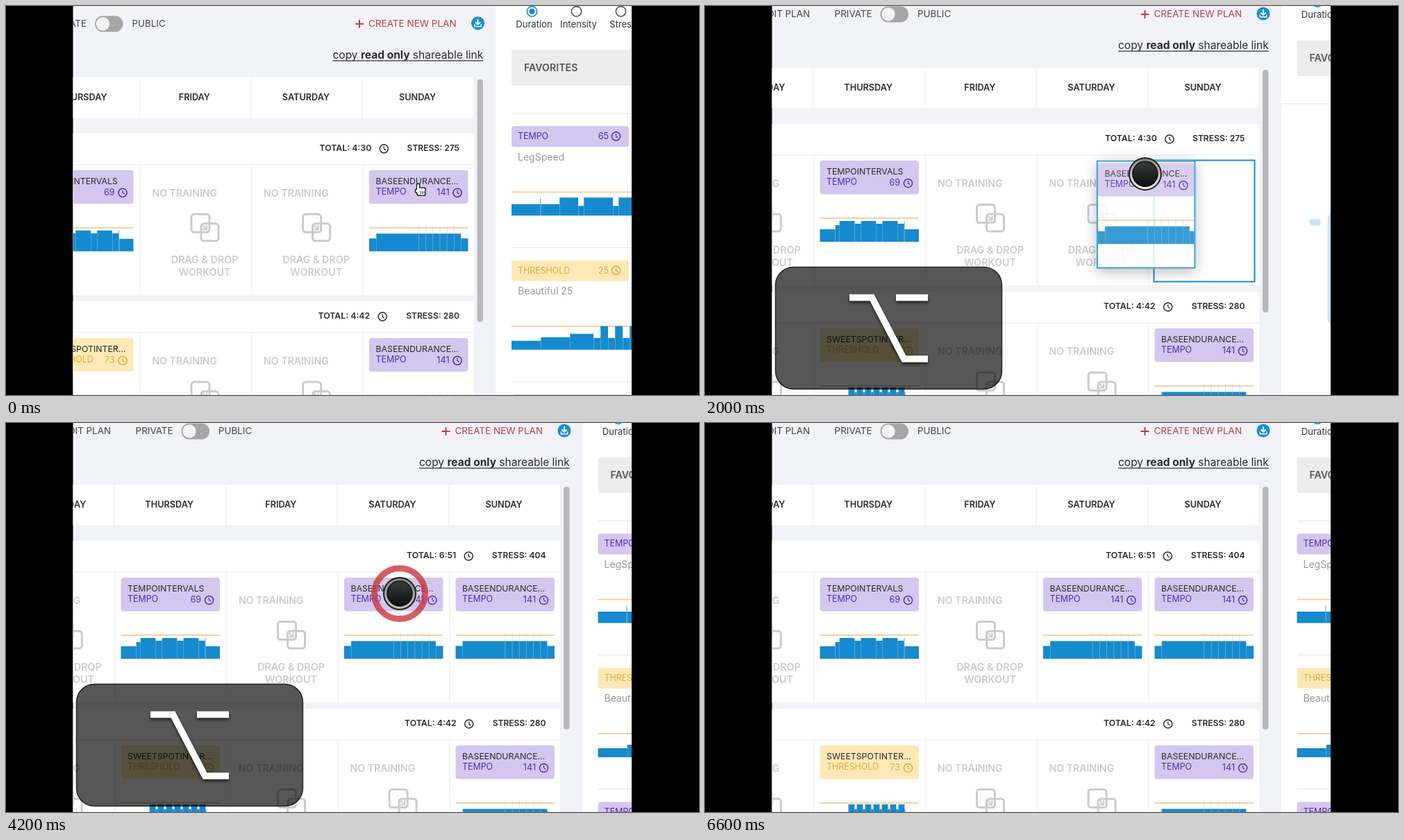
An HTML page with a canvas for the animation above (8000 ms loop, 998 px wide and 561 px high).

```html
<!DOCTYPE html>
<html lang="en">
<head>
<meta charset="utf-8">
<title>Training plan: copy a workout by dragging</title>
<style>
html, body { margin: 0; width: 100%; height: 100%; overflow: hidden; background: #000; }
canvas { display: block; }
</style>
</head>
<body>
<canvas id="stage" width="998" height="561"></canvas>
<script>
const ctx = document.getElementById('stage').getContext('2d');
const COLUMN = 160.6, WEEK = 242;
const INK = '#2b2b2e', BLUE = '#168ace', PALE = '#cbcbcd', RED = '#bf3f4c', RULE = '#ececef';
const ZONES = {
  TEMPO: { fill: '#d4c6ee', ink: '#4a2cbd' },
  THRESHOLD: { fill: '#fde9b7', ink: '#e5aa32' }
};

// Moments are counted in ticks, 15 per second.
const TICKS = 120, PANNED = 8, GRAB = 13, LIFT = 20, NEXT_DAY = 32, DROP = 58, RING_END = 68, FADE = 95;

// Pointer: start, then moves as [from tick, to tick, dx, dy].
const START = [721.5, 251];
const MOVES = [[0, PANNED, -3, -8], [19, NEXT_DAY, -100, -1], [NEXT_DAY, 47, -51.5, 4], [79, 80, 1, 1], [82, 90, 133, 2]];

// Height of each workout's power profile at x.
const endurance = x => x < 10 || x >= 132 ? 18.5 : 25.5;
const intervals = x => x < 22 || x >= 122 ? 18 : x < 28 ? 24 : (x - 28) % 31 < 22 ? 30 : 26;
const sweetspot = x => x < 22 ? 14 : x < 41 || x >= 123 ? 0 : (x - 41) % 12 < 9 ? 32 : 25;
const legspeed = x => x === 41 ? 25 : x < 69 ? 16.5 : (x - 46) % 50 < 8 ? 14 : 26;
const ramp = x => x < 118 ? 13 + 5 * Math.floor(x / 42) : (x - 118) % 21 < 10 ? 17 : 34;

const clamp = v => Math.max(0, Math.min(1, v));
const progress = (k, from, to) => clamp((k - from) / (to - from));
const smooth = v => v * v * (3 - 2 * v);

function text(str, x, y, size, color, weight = 400, align = 'left') {
  ctx.font = `${weight} ${size}px Inter, "Open Sans", sans-serif`;
  ctx.textAlign = align;
  ctx.textBaseline = 'middle';
  ctx.fillStyle = color;
  ctx.fillText(str, x, y);
  return ctx.measureText(str).width;
}

function rect(x, y, w, h, color) {
  ctx.fillStyle = color;
  ctx.fillRect(x, y, w, h);
}

function paint(fill, stroke, width) {
  if (fill) { ctx.fillStyle = fill; ctx.fill(); }
  if (stroke) { ctx.strokeStyle = stroke; ctx.lineWidth = width; ctx.stroke(); }
}

function round(x, y, w, h, r, fill, stroke, width = 1) {
  ctx.beginPath();
  ctx.roundRect(x, y, w, h, r);
  paint(fill, stroke, width);
}

function circle(x, y, r, fill, stroke, width = 1) {
  ctx.beginPath();
  ctx.arc(x, y, r, 0, 2 * Math.PI);
  paint(fill, stroke, width);
}

function line(points, color, width) {
  ctx.beginPath();
  points.forEach(p => ctx.lineTo(...p));
  paint(null, color, width);
}

function clock(x, y, color) {
  circle(x, y, 6.1, null, color, 1.5);
  line([[x, y - 3.5], [x, y], [x + 2.5, y + 1.8]], color, 1.3);
}

function chart(height, x, base, w) {
  rect(x, base - 35, w, 2, '#f2d2a0');
  ctx.beginPath();
  ctx.moveTo(x, base);
  for (let i = 0; i < w; i++) {
    ctx.lineTo(x + i, base - height(i));
    ctx.lineTo(x + Math.min(i + 1, w), base - height(i));
  }
  ctx.lineTo(x + w, base);
  paint(BLUE);
  for (let i = 1; i < w; i++) {
    if (height(i) !== height(i - 1)) rect(x + i, base - 30, .6, 30, 'rgba(255,255,255,.4)');
  }
  if (height === endurance) {
    for (let i = 71; i < 132; i += 10.2) {
      rect(x + i, base - 25.5, .7, 25.5, 'rgba(255,255,255,.4)');
      if (i < 125) rect(x + i, base - 37, .8, 11.5, 'rgba(80,130,170,.25)');
    }
  }
}

function workout(x, y, title, zone, minutes, profile, w = 142.5) {
  const { fill, ink } = ZONES[zone];
  round(x, y, w, 48.5, 4, fill);
  text(title, x + 9.5, y + 16.5, 12.3, INK);
  text(zone, x + 9.5, y + 31.5, 12.4, ink);
  text(minutes, x + w - 27, y + 32.5, 12.6, ink, 400, 'right');
  clock(x + w - 15.5, y + 32.5, ink);
  chart(profile, x, y + 117, w);
}

const enduranceRide = (x, y, w) => workout(x, y, 'BASEENDURANCE...', 'TEMPO', '141', endurance, w);

function emptyDay(column, y) {
  const x = 318 + column * COLUMN;
  text('NO TRAINING', x + 17, y + 34, 14.1, PALE, 600);
  round(x + 73.5, y + 63.5, 26, 26, 4, null, PALE, 3);
  round(x + 87.5, y + 77, 25, 25, 4, null, PALE, 3);
  line([[x + 88, y + 78], [x + 95, y + 85]], PALE, 2);
  line([[x + 95.5, y + 79.5], [x + 95.5, y + 85.5], [x + 89.5, y + 85.5]], PALE, 2);
  text('DRAG & DROP', x + 92.5, y + 130, 14.3, PALE, 600, 'center');
  text('WORKOUT', x + 92.5, y + 148, 14.3, PALE, 600, 'center');
}

function weekFrame(y, total, totalX, stress) {
  rect(0, y, 798, 233, '#fff');
  rect(0, y + 44.5, 798, 1, RULE);
  for (let i = 0; i < 4; i++) rect(156.5 + i * COLUMN, y + 45, 1, 188, RULE);
  const width = text('TOTAL: ' + total, totalX, y + 21.5, 12.3, INK, 600);
  clock(totalX + width + 18, y + 22, INK);
  text('STRESS: ' + stress, 777.5, y + 21.5, 12.1, INK, 600, 'right');
}

function toolbar() {
  text('EDIT PLAN', 151, 12, 13.4, '#444', 400, 'right');
  text('PRIVATE', 240.5, 12, 13.4, '#444', 400, 'right');
  round(252.5, .5, 40.5, 23, 11.5, '#a6a6a6');
  circle(264, 12, 9.7, '#f3f3f3');
  text('PUBLIC', 306, 12, 13.4, '#444');
  line([[627.5, 12], [639.5, 12]], RED, 2);
  line([[633.5, 6], [633.5, 18]], RED, 2);
  text('CREATE NEW PLAN', 646.5, 12, 13.5, RED);

  circle(804, 11, 9.6, '#168fd5');
  line([[804, 5], [804, 12]], '#fff', 2);
  line([[800.3, 9.5], [804, 13], [807.7, 9.5]], '#fff', 1.8);
  line([[799.3, 12.5], [799.3, 15.8], [808.7, 15.8], [808.7, 12.5]], '#fff', 1.4);

  let x = 595;
  x += text('copy ', x, 57.5, 15.5, INK);
  x += text('read only', x, 57.5, 15.5, INK, 700);
  x += text(' shareable link', x, 57.5, 15.5, INK);
  rect(595, 64.5, x - 595, 1.2, INK);
}

function calendar(copied, slot) {
  rect(0, 89, 798, 58.5, '#fff');
  ['WEDNESDAY', 'THURSDAY', 'FRIDAY', 'SATURDAY', 'SUNDAY'].forEach((day, i) => {
    text(day, 74.6 + i * COLUMN, 118, 12.7, INK, 600, 'center');
    rect(155.5 + i * COLUMN, 89, 1, 58, RULE);
  });
  if (copied) weekFrame(170, '6:51', 577, '404');
  else weekFrame(170, '4:30', 576, '275');
  weekFrame(170 + WEEK, '4:42', 574, '280');
  round(803, 92, 8.5, 350, 4, '#b9b9bb');

  for (const y of [223, 223 + WEEK]) {
    emptyDay(-2, y);
    emptyDay(0, y);
  }
  workout(165.5, 223, 'TEMPOINTERVALS', 'TEMPO', '69', intervals);
  workout(165.5, 223 + WEEK, 'SWEETSPOTINTER...', 'THRESHOLD', '73', sweetspot);
  emptyDay(1, 223 + WEEK);
  enduranceRide(647.5, 223 + WEEK);
  if (copied) enduranceRide(647.5 - COLUMN, 223);
  else emptyDay(1, 223);
  if (slot !== 'sunday') enduranceRide(647.5, 223);
}

function favorite(y, zone, minutes, name, profile) {
  const { fill, ink } = ZONES[zone];
  rect(853, y - 19, 180, 1, '#e3e3e5');
  round(852.5, y, 169, 30, 4, fill);
  text(zone, 861.5, y + 15, 12.4, ink);
  text(minutes, 992.5, y + 15, 12.6, ink, 400, 'right');
  clock(1003, y + 14.5, ink);
  text(name, 861.5, y + 45, 14, '#999');
  chart(profile, 852.5, y + 129, 174);
}

function sidebar(showTrash) {
  rect(830, -20, 220, 620, '#fff');
  ['Duration', 'Intensity', 'Stress'].forEach((label, i) => {
    const x = 882 + i * 64, color = i ? '#555' : '#1b87e0';
    circle(x, -6, 7.2, '#fff', color, 1.6);
    if (!i) circle(x, -6, 4.2, color);
    text(label, x + 3, 13, 13.1, '#333', 400, 'center');
  });
  round(852.5, 49.5, 200, 51.5, 4, '#ececed');
  text('FAVORITES', 870.5, 75.5, 14.2, '#555', 600);
  if (showTrash) {
    rect(830, 140.5, 200, 1, '#e3e3e5');
    round(870.5, 307, 16, 10, 4, '#c8e6f4');
    round(896.5, 296, 90, 166, 12, '#c8e6f4');
    return;
  }
  favorite(159.5, 'TEMPO', '65', 'LegSpeed', legspeed);
  favorite(353, 'THRESHOLD', '25', 'Beautiful 25', ramp);
  favorite(546.5, 'TEMPO', '60', 'Steady', endurance);
}

// A shadow around the card only, so that it does not darken the translucent inside.
function cardShadow(x, y, w, h) {
  ctx.save();
  ctx.beginPath();
  ctx.rect(0, 0, 998, 561);
  ctx.rect(x, y, w, h);
  ctx.clip('evenodd');
  ctx.shadowColor = 'rgba(0,0,0,.28)';
  ctx.shadowBlur = 18;
  ctx.shadowOffsetY = 4;
  rect(x, y, w, h, '#fff');
  ctx.restore();
}

function outline(x, y, w, h) {
  ctx.strokeStyle = BLUE;
  ctx.lineWidth = 2;
  ctx.strokeRect(x, y, w, h);
}

function draggedCard(x, y, lifted) {
  const left = x - 69, top = y - 18.5;
  ctx.save();
  if (lifted) {
    cardShadow(left - 1, top - 1, 142.5, 156);
    ctx.globalAlpha = .85;
  }
  rect(left - 1, top - 1, 142.5, 156, '#fff');
  enduranceRide(left + 1, top + 2.5, 138.5);
  outline(left, top, 140.5, 154);
  ctx.restore();
}

function optionKey(alpha) {
  ctx.save();
  ctx.globalAlpha = alpha;
  round(101.5, 376.5, 326, 176, 26, 'rgba(0,0,0,.66)', 'rgba(0,0,0,.75)', 1.5);
  ctx.shadowColor = 'rgba(0,0,0,.6)';
  ctx.shadowBlur = 4;
  ctx.shadowOffsetY = 3;
  line([[208, 420.5], [240.5, 420.5], [286.5, 509], [321, 509]], '#fff', 9.5);
  line([[275, 420.5], [321, 420.5]], '#fff', 9.5);
  ctx.restore();
}

function verticalFade(y, r, from, to) {
  const gradient = ctx.createLinearGradient(0, y - r, 0, y + r);
  gradient.addColorStop(0, from);
  gradient.addColorStop(1, to);
  return gradient;
}

function disk(x, y, alpha, pressed) {
  ctx.save();
  ctx.globalAlpha = alpha;
  circle(x, y, 24, '#1d1f1d');
  circle(x, y, 22, verticalFade(y, 22, '#83857c', pressed ? '#f7f7f2' : '#c4c5b4'));
  circle(x, y, 18, verticalFade(y, 18, '#3a3d3d', '#0d0f0f'), '#111', 1.5);
  ctx.restore();
}

function hand(x, y) {
  for (const [grow, color] of [[1.2, '#111'], [0, '#fff']]) {
    const part = (dx, dy, w, h) => round(x + dx - grow, y + dy - grow, w + 2 * grow, h + 2 * grow, 2, color);
    part(-5, -8, 3, 14);
    part(-7, 0, 5, 4);
    part(-4, -2, 10.5, 10);
  }
  for (let i = 0; i < 3; i++) rect(x - .5 + i * 2.5, y + 2, 1, 4.5, '#333');
}

function releaseRing(x, y, p) {
  circle(x, y, 25 + 23 * p, null, `rgba(200,55,60,${.8 * clamp(2 - 2 * p)})`, 9);
}

function pointerAt(k) {
  return MOVES.reduce(([x, y], [from, to, dx, dy]) => {
    const p = progress(k, from, to);
    return [x + dx * p, y + dy * p];
  }, START);
}

function draw(k) {
  const pan = 1 - smooth(progress(k, 0, PANNED));
  const [x, y] = pointerAt(k);
  const copied = k >= DROP;
  const grabbed = k >= GRAB && !copied, lifted = k >= LIFT && !copied;
  const slot = !grabbed ? null : k < NEXT_DAY ? 'sunday' : 'saturday';
  const visible = 1 - progress(k, FADE, FADE + 4);

  rect(0, 0, 998, 561, '#000');
  ctx.save();
  ctx.beginPath();
  ctx.rect(96.5, 0, 804.5, 561);
  ctx.clip();
  rect(96, 0, 806, 561, '#f2f3f8');
  ctx.translate(-124.5 * pan, 13.8 * pan);
  toolbar();
  calendar(copied, slot);
  sidebar(lifted);
  if (lifted) outline(slot === 'sunday' ? 646.5 : 486, 222.5, 145, 175);
  if (grabbed) draggedCard(x, y, lifted);
  if (copied && k < RING_END) releaseRing(x, y, progress(k, DROP, RING_END));
  if (k < GRAB) hand(x, y);
  else disk(x, y, visible, grabbed);
  ctx.restore();
  optionKey(progress(k, 4, PANNED) * visible);
}

function frame() {
  const t = performance.now() % 8000;
  draw(Math.floor((t + 5) * .015) % TICKS);
  requestAnimationFrame(frame);
}
frame();
</script>
</body>
</html>
```
